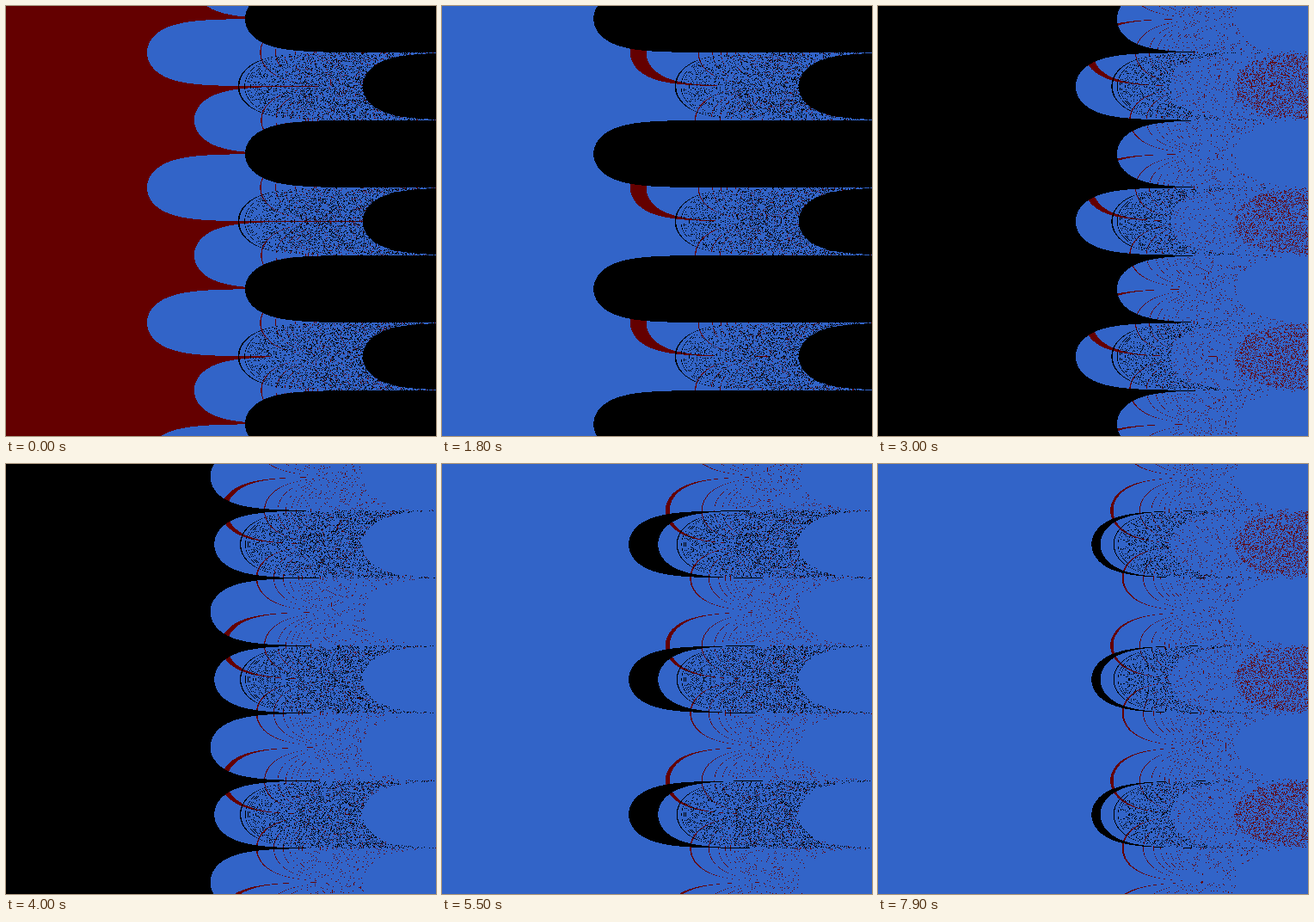
Animation, 500 px wide and 500 px high, one loop 8000 ms. Source, as an HTML page with a canvas:

```html
<!DOCTYPE html>
<html>
<head>
<meta charset="utf-8">
<style>
html, body { margin: 0; width: 100%; height: 100%; overflow: hidden; background: #000; }
canvas { display: block; }
</style>
</head>
<body>
<canvas id="stage" width="500" height="500"></canvas>
<script>
// Phase plot of exp(exp(z)) for |Re z|, |Im z| <= 10.
// Modulus (period 10) and argument each index a ring of 200 cells that rolls one cell per step.
const SIZE = 500, CELLS = 200, STEPS = 80, STEP_MS = 100;
const RED = 0xff000064, BLUE = 0xffc86432, BLACK = 0xff000000;

const ctx = document.getElementById('stage').getContext('2d');
const image = ctx.createImageData(SIZE, SIZE);
const pixels = new Uint32Array(image.data.buffer);
const modCell = new Uint8Array(SIZE * SIZE);
const argCell = new Uint8Array(SIZE * SIZE);

const wrap = n => ((n % CELLS) + CELLS) % CELLS;
const coord = p => -10 + p * 0.04;

for (let py = 0, i = 0; py < SIZE; py++) {
  const y = coord(py);
  for (let px = 0; px < SIZE; px++, i++) {
    const e = Math.exp(coord(px));
    const r = Math.exp(e * Math.cos(y));
    const v = e * Math.sin(y);
    // Scaling by r lets overflow and underflow collapse the argument; an infinite r lands in cell 0.
    const arg = Math.atan2(r * Math.sin(v), r * Math.cos(v));
    modCell[i] = Math.floor((r % 10) * 20);
    argCell[i] = wrap(Math.floor(arg / Math.PI * 100));
  }
}

function draw(step) {
  const roll = step + 1;
  for (let i = 0; i < pixels.length; i++) {
    pixels[i] = wrap(modCell[i] - roll) >= 170 ? BLACK
      : wrap(argCell[i] + roll) < 10 ? RED : BLUE;
  }
  ctx.putImageData(image, 0, 0);
}

let shown = -1;
const start = performance.now();
function tick() {
  const step = Math.floor((performance.now() - start) / STEP_MS) % STEPS;
  if (step !== shown) draw(shown = step);
  requestAnimationFrame(tick);
}
tick();
</script>
</body>
</html>
```
